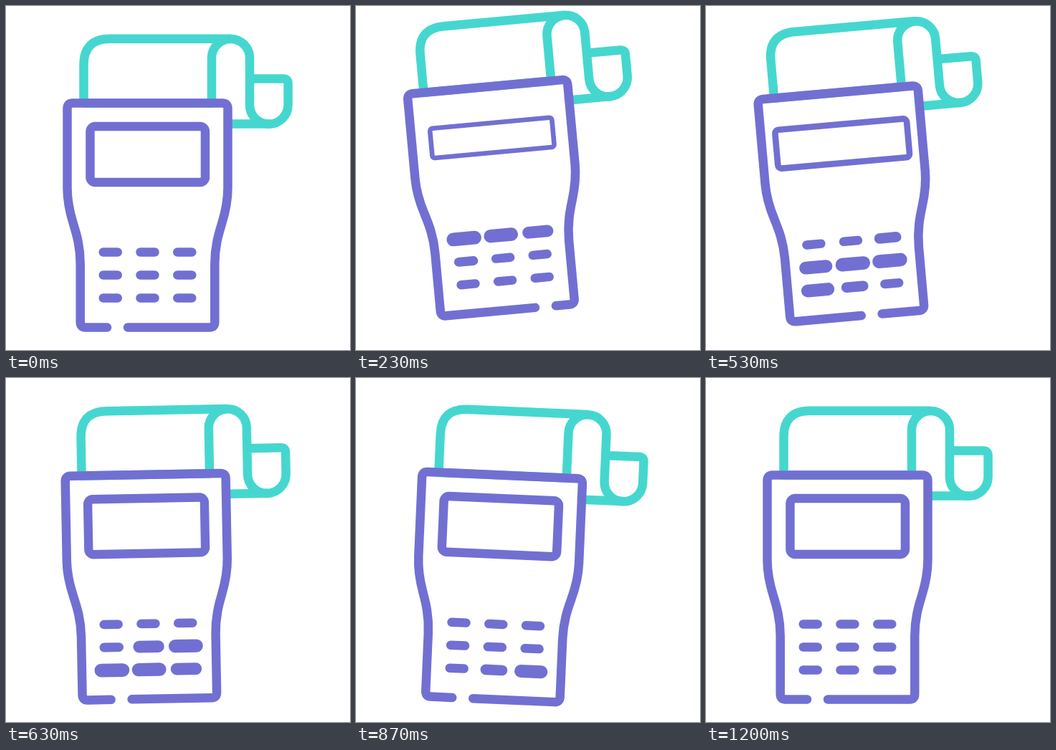
Write an HTML page that moves like this. It is 480 px wide and 480 px high and loops after 1.53 s.

```html
<!DOCTYPE html>
<html lang="en">
<head>
<meta charset="utf-8">
<title>Card terminal</title>
<style>
  html, body { margin: 0; width: 100%; height: 100%; overflow: hidden; background: #fff; }
  svg { display: block; width: 100%; height: 100%; }
  g { fill: none; stroke-width: 12.5; stroke-linecap: round; stroke-linejoin: round; }
  .paper { stroke: #45d7cf; }
  .device { stroke: #7170d2; }
</style>
</head>
<body>
<svg viewBox="0 0 480 480">
  <g id="terminal">
    <g class="paper">
      <path d="M312 45.8H145Q108.5 45.8 108.5 82V135.5H287V72.5A26.5 26.5 0 0 1 340 72.5V138A26.8 26.8 0 0 0 393.6 138V108Q393.6 101.5 387 101.5H340"/>
      <path d="M312 164.6H367"/>
    </g>
    <g class="device">
      <path id="body"/>
      <rect id="screen" y="-39" height="78" rx="7"/>
      <g id="keys"></g>
    </g>
  </g>
</svg>
<script>
const LOOP = 1530, STEP = 100 / 3, LAST = 36;
const $ = id => document.getElementById(id);

const keys = Array.from({ length: 9 }, () => {
  const key = document.createElementNS('http://www.w3.org/2000/svg', 'path');
  key.setAttribute('d', 'M-10 0H10');
  return $('keys').appendChild(key);
});

// cubic-bezier(.4, 0, .2, 1)
function ease(x) {
  let lo = 0, hi = 1;
  for (let i = 0; i < 24; i++) {
    const s = (lo + hi) / 2, r = 1 - s;
    if (1.2 * s * r * r + 0.6 * s * s * r + s ** 3 < x) lo = s; else hi = s;
  }
  return lo * lo * (3 - 2 * lo);
}

// Rises to 1 over `half` steps and falls back the same way.
const pulse = (t, half) => ease(Math.max(0, 1 - Math.abs(t / half - 1)));

const swing = [[0, 0], [8.8, -5.85], [14.2, -5.85], [24, 4], [30, -2], [36, 0]];
function tilt(t) {
  const i = Math.max(1, swing.findIndex(([time]) => t <= time));
  const [t0, a] = swing[i - 1], [t1, b] = swing[i];
  return a + (b - a) * (1 - Math.cos(Math.PI * (t - t0) / (t1 - t0))) / 2;
}

function draw(t) {
  const lift = pulse(t, 10);
  const gap = 141 + 101 * lift;
  const width = 160.5 + 172 * lift;

  $('terminal').setAttribute('transform',
    `translate(0 ${-25 * lift}) rotate(${tilt(t)} 197.5 292)`);
  $('body').setAttribute('d', `M${gap} 448.5H111Q103.7 448.5 103.7 441V360
    C103.7 335 98 317 94 304C89 288 85.5 272 85.5 254V143Q85.5 135.5 93 135.5
    H302Q309.5 135.5 309.5 143V254C309.5 272 306 288 301 304
    C297 317 291.3 335 291.3 360V441Q291.3 448.5 284 448.5H${gap + 29}`);
  $('screen').setAttribute('x', -width / 2);
  $('screen').setAttribute('width', width);
  $('screen').setAttribute('transform', `translate(197.7 207) scale(${1 - lift / 2})`);

  keys.forEach((key, i) => {
    const x = 145.7 + 51.8 * (i % 3), y = 343.5 + 32 * Math.floor(i / 3);
    const scale = 1 + pulse(t - 2 * i, 7) / 2;
    key.setAttribute('transform', `translate(${x} ${y}) scale(${scale})`);
  });
}

const start = performance.now();
function tick() {
  const ms = (performance.now() - start) % LOOP;
  draw(Math.min(LAST, Math.floor((ms + 3.4) / STEP)));
  requestAnimationFrame(tick);
}
tick();
</script>
</body>
</html>
```
